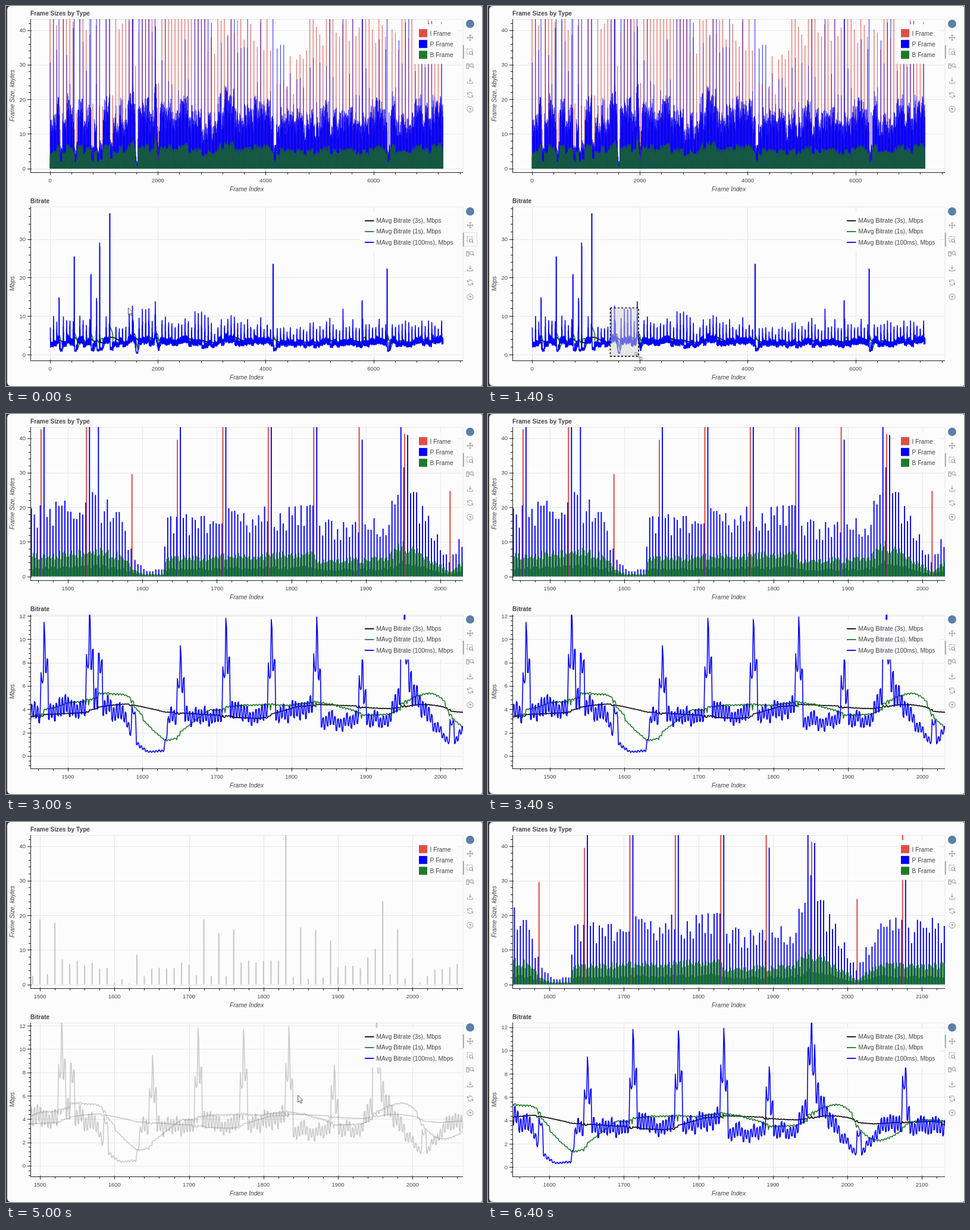
These frames come from a looping animation (800 px wide and 640 px high, 6500 ms). An HTML page with a canvas:

```html
<!DOCTYPE html>
<html lang="en">
<head>
<meta charset="utf-8">
<title>Frame sizes and bitrate</title>
<style>
  html, body { margin: 0; width: 100%; height: 100%; overflow: hidden; background: #fdfcfd; }
  canvas { display: block; }
</style>
</head>
<body>
<canvas id="stage" width="800" height="640"></canvas>
<script>
const g = document.getElementById('stage').getContext('2d');
const LOOP = 6500, STEP = 100;
const FONT = '"Liberation Sans", Arial, sans-serif';
const RED = '#de4f45', BLUE = '#0000ff', GREEN = '#1f7a28', INK = '#444';
const LEFT = 41, RIGHT = 768;

// ---------- data: one group = I frame, then P on every 4th frame, B between ----------
const COUNT = 7290, GROUP = 61;

function rand(n) {
  let h = Math.imul(n + 977, 2654435761);
  h = Math.imul(h ^ h >>> 15, 2246822519);
  h = Math.imul(h ^ h >>> 13, 3266489917);
  return ((h ^ h >>> 16) >>> 0) / 4294967296;
}

// linear interpolation through [key, value...] rows
function along(points, key, col = 1) {
  if (key <= points[0][0]) return points[0][col];
  for (let i = 1; i < points.length; i++) {
    const a = points[i - 1], b = points[i];
    if (key <= b[0]) return a[col] + (b[col] - a[col]) * (key - a[0]) / (b[0] - a[0]);
  }
  return points[points.length - 1][col];
}

// scene activity = typical P size in kbytes
const activity = [[0, 17], [1460, 17], [1545, 21], [1572, 17], [1586, 7], [1602, 1.8], [1627, 1.8],
  [1632, 15], [1829, 19], [1836, 13.5], [1930, 15], [1948, 28], [1975, 19], [2013, 4], [2040, 16],
  [2600, 18], [2700, 14], [3050, 14.5], [3200, 20], [4050, 19], [4200, 15], [7290, 17.5]];
const iLevel = [[0, 47], [2700, 46], [2900, 40], [4050, 40], [4150, 28], [4700, 28], [4800, 42], [7290, 40]];
// [frame, peak Mbps]
const bursts = [[166, 14.8], [447, 25.4], [756, 20.4], [861, 14.5], [916, 29], [1104, 36.6],
  [1541, 8.8], [1947, 10.2], [4134, 23.5], [5430, 11.8], [5783, 13.8], [6247, 22.2]];
// first and last group of the runs with a heavy first P frame
const heavyRuns = [[24, 25], [28, 30], [44, 48]];

const typeOf = n => n % GROUP === 0 ? 'I' : n % GROUP % 4 === 0 ? 'P' : 'B';

function frameSize(n) {
  const group = Math.floor(n / GROUP), pos = n % GROUP, r = rand(n);
  const level = along(activity, n);
  const swing = n > 1440 && n < 2140 ? 1 : .68 + .4 * rand(group + 50000);
  const type = typeOf(n);
  if (type === 'I') return (along(iLevel, n) + 14 * (r - .5)) * (.35 + .65 * Math.min(1, level / 13));
  if (type === 'B') return .35 * level * swing * (pos % 4 === 2 ? .42 : 1) * (.75 + .4 * r);
  if (pos === 4 && heavyRuns.some(([a, b]) => group >= a && group <= b)) return 60 + 8 * r;
  if (pos === 4 && level > 10) return 16 + 34 * r * r;
  return level * swing * (.72 + .48 * r);
}

const sizes = Array.from({ length: COUNT }, (_, n) => frameSize(n));
for (const [at, peak] of bursts) {
  let n = at;
  while (typeOf(n) !== 'P') n++;
  const near = sizes.slice(n - 5, n).reduce((a, b) => a + b, 0);
  sizes[n] = Math.max(20, peak * 12.5 - near);
  if (peak > 14) for (let i = n + 6; i < n + 62; i++) sizes[i] *= .4;
}

// trailing mean over w frames at 60 fps, in Mbps
function movingRate(w) {
  let sum = 0;
  return sizes.map((s, n) => {
    sum += s - (n >= w ? sizes[n - w] : 0);
    return n >= w - 1 ? sum / w * .48 : null;
  });
}
const rates = [
  { label: 'MAvg Bitrate (3s), Mbps', color: '#000', data: movingRate(180) },
  { label: 'MAvg Bitrate (1s), Mbps', color: GREEN, data: movingRate(60) },
  { label: 'MAvg Bitrate (100ms), Mbps', color: BLUE, data: movingRate(6) }
];
const types = [['I', RED], ['P', BLUE], ['B', GREEN]];

// ---------- timeline ----------
const drag = [[300, 206, 508.5], [700, 236, 570], [1300, 252, 589], [1900, 258, 594]];
const pointer = [[3600, 420, 470], [3900, 780, 369], [4100, 780, 369], [4400, 567.5, 456],
  [4600, 537.5, 457], [5500, 432, 464], [5900, 411.5, 462.5]];
const ZOOM_AT = 2900, PAN_PICK = 4000, PAN_FROM = 4600, PAN_TO = 5900, SHARP_AT = 6100;

function viewAt(t) {
  if (t < ZOOM_AT) return { ox: 74, sx: .09062, oy: 587, sy: 6.48, xStep: 2000, yStep: 10 };
  const p = Math.max(PAN_FROM, Math.min(PAN_TO, t));
  return {
    ox: -1774.3 + along(pointer, p) - 537.5, sx: 1.2522,
    oy: 575.8 + along(pointer, p, 2) - 457, sy: 19.65, xStep: 100, yStep: 2
  };
}

// ---------- drawing ----------
function line(color, width, ...pts) {
  g.strokeStyle = color;
  g.lineWidth = width;
  g.beginPath();
  for (let i = 0; i < pts.length; i += 2) g.lineTo(pts[i], pts[i + 1]);
  g.stroke();
}

function text(s, x, y, size, align = 'left', style = '') {
  g.font = `${style} ${size}px ${FONT}`;
  g.textAlign = align;
  g.fillStyle = INK;
  g.fillText(s, x, y);
}

// calls fn(value, pixel, isMajor) for every tick inside lo..hi
function ticks(o, s, step, lo, hi, fn) {
  const a = (lo - o) / s, b = (hi - o) / s, minor = step / 5;
  const first = Math.ceil(Math.min(a, b) / minor), last = Math.floor(Math.max(a, b) / minor);
  for (let i = first; i <= last; i++) fn(Math.round(i * minor), o + i * minor * s, i % 5 === 0);
}

function grid(p) {
  const put = (px, major, vertical) => {
    if (!major) return;
    const q = Math.round(px) + .5;
    if (vertical) line('#e6e5e8', 1, q, p.top, q, p.bottom);
    else line('#e6e5e8', 1, LEFT, q, RIGHT, q);
  };
  ticks(p.ox, p.sx, p.xStep, LEFT, RIGHT, (v, px, major) => put(px, major, true));
  ticks(p.oy, -p.sy, p.yStep, p.bottom, p.top, (v, py, major) => put(py, major, false));
  g.strokeStyle = '#e6e5e8';
  g.strokeRect(LEFT + .5, p.top + .5, RIGHT - LEFT - .5, p.bottom - p.top);
}

function axes(p) {
  const { top, bottom } = p;
  line('#222', 1, LEFT + .5, top, LEFT + .5, bottom + .5);
  line('#222', 1, LEFT, bottom + .5, RIGHT, bottom + .5);
  ticks(p.ox, p.sx, p.xStep, LEFT, RIGHT, (v, px, major) => {
    const x = Math.round(px) + .5;
    line('#222', 1, x, bottom - (major ? 1.5 : 0), x, bottom + (major ? 5 : 3.5));
    if (major) text(v, px, bottom + 16.5, 9.4, 'center');
  });
  ticks(p.oy, -p.sy, p.yStep, bottom, top, (v, py, major) => {
    const y = Math.round(py) + .5;
    line('#222', 1, LEFT - (major ? 5 : 3), y, LEFT + (major ? 2 : 0), y);
    if (major) text(v, 33, py + 3.5, 9.4, 'right');
  });
  text(p.title, LEFT, top - 6.5, 10.2, 'left', 'bold');
  text('Frame Index', (LEFT + RIGHT) / 2, bottom + 32, 10.2, 'center', 'italic');
  g.save();
  g.translate(14, (top + bottom) / 2);
  g.rotate(-Math.PI / 2);
  text(p.yLabel, 0, 0, 10.2, 'center', 'italic');
  g.restore();
}

function clipTo(p, fn) {
  g.save();
  g.beginPath();
  g.rect(LEFT, p.top, RIGHT - LEFT, p.bottom - p.top);
  g.clip();
  fn();
  g.restore();
}

function bars(p, grey) {
  const w = p.sx * .9 + .78;
  const bar = n => {
    const h = sizes[n] * p.sy;
    g.fillRect(p.ox + n * p.sx - w / 2, p.oy - h, w, h);
  };
  const layer = (type, color, alpha = 1) => {
    g.fillStyle = color;
    g.globalAlpha = alpha;
    for (let n = 0; n < COUNT; n++) if (typeOf(n) === type) bar(n);
  };
  if (grey) {
    g.fillStyle = '#c2c1c3';
    for (let n = 0; n < COUNT; n += 10) bar(n);
    return;
  }
  layer('I', RED);
  layer('P', BLUE);
  layer('I', RED, .35);   // I frames shimmer through the blue
  layer('B', p.sx < 1 ? '#185a45' : GREEN);
}

function curves(p, grey) {
  g.lineJoin = 'round';
  g.lineWidth = 1.6;
  for (const { color, data } of rates) {
    g.strokeStyle = grey ? 'rgba(128,128,128,.4)' : color;
    g.beginPath();
    data.forEach((v, n) => { if (v !== null) g.lineTo(p.ox + n * p.sx, p.oy - v * p.sy); });
    g.stroke();
  }
}

function legendBox(x, y) {
  g.fillStyle = 'rgba(253,252,253,.96)';
  g.fillRect(x, y, 760 - x, 67);
}

function legends() {
  legendBox(686, 30.5);
  types.forEach(([type, color], i) => {
    g.fillStyle = color;
    g.fillRect(694, 39 + i * 18.2, 14, 13.5);
    text(type + ' Frame', 712.5, 49.5 + i * 18.2, 10.2);
  });
  legendBox(595, 346.5);
  rates.forEach(({ label, color }, i) => {
    line(color, 1.8, 603, 361.7 + i * 18.2, 618.5, 361.7 + i * 18.2);
    text(label, 622.5, 365.2 + i * 18.2, 10.2);
  });
}

const icons = {
  pan() {
    line(g.strokeStyle, 1, -4.5, 0, 4.5, 0);
    line(g.strokeStyle, 1, 0, -4.5, 0, 4.5);
    for (let i = 0; i < 4; i++) {
      line(g.strokeStyle, 1, -1.8, -3.3, 0, -5.2, 1.8, -3.3);
      g.rotate(Math.PI / 2);
    }
  },
  box() {
    g.setLineDash([2, 1.5]);
    g.strokeRect(-5, -5, 9, 9);
    g.setLineDash([]);
    lens(1.5, 1.5, 2.6);
  },
  wheel() {
    g.strokeRect(-6, -4, 4, 7.5);
    line(g.strokeStyle, 1, -4, -3, -4, -1);
    lens(2.5, -1.5, 2.8);
  },
  save() {
    line(g.strokeStyle, 1, -4.5, 2, -4.5, 4.5, 4.5, 4.5, 4.5, 2);
    line(g.strokeStyle, 1, 0, -5, 0, 1.5);
    line(g.strokeStyle, 1, -2.5, -1, 0, 1.5, 2.5, -1);
  },
  reset() {
    for (let i = 0; i < 2; i++) {
      g.beginPath();
      g.arc(0, 0, 4.3, Math.PI * 1.05, Math.PI * 1.9);
      g.stroke();
      line(g.strokeStyle, 1, -4.5, -4.5, -4.3, -1.2, -1.5, -1.2);
      g.rotate(Math.PI);
    }
  },
  help() {
    g.beginPath();
    g.arc(0, 0, 5, 0, 7);
    g.stroke();
    text('?', 0, 2.8, 8, 'center');
  }
};

function lens(x, y, r) {
  g.beginPath();
  g.arc(x, y, r, 0, 7);
  g.stroke();
  line(g.strokeStyle, 1.2, x + r * .7, y + r * .7, x + r * .7 + 2, y + r * .7 + 2);
}

function toolbar(top, active, hover) {
  g.fillStyle = '#5b7fa8';
  g.beginPath();
  g.arc(780, top + 30, 7, 0, 7);
  g.fill();
  Object.keys(icons).forEach((name, i) => {
    const y = top + 53.3 + i * 24.1;
    if (name === hover) {
      g.strokeStyle = '#dcdbde';
      g.lineWidth = 1;
      g.strokeRect(768.5, Math.round(y) - 11.5, 23, 23);
    }
    if (name === active) line('#62b5c4', 1.8, 768.8, y - 11.5, 768.8, y + 11.5);
    g.save();
    g.translate(780, y);
    g.strokeStyle = '#8f9396';
    g.lineWidth = 1;
    icons[name]();
    g.restore();
  });
}

function selection(x, y) {
  g.fillStyle = 'rgba(211,211,211,.5)';
  g.fillRect(205.5, 508.5, x - 205.5, y - 508.5);
  g.setLineDash([3.1, 3.1]);
  g.strokeStyle = '#000';
  g.lineWidth = 1.6;
  g.strokeRect(205.5, 508.5, x - 205.5, y - 508.5);
  g.setLineDash([]);
}

function resizeCursor(x, y) {
  for (const [color, w] of [['#555', 2.6], ['#fff', 1.2]]) {
    line(color, w, x - 5, y - 5, x + 5, y + 5);
    line(color, w, x - 5, y - 1.5, x - 5, y - 5, x - 1.5, y - 5);
    line(color, w, x + 5, y + 1.5, x + 5, y + 5, x + 1.5, y + 5);
  }
}

function arrow(x, y) {
  g.save();
  g.translate(x, y);
  g.beginPath();
  for (const [px, py] of [[0, 0], [0, 12], [2.7, 9.6], [4.6, 13.6], [6.4, 12.8], [4.6, 8.9], [8.3, 8.6]])
    g.lineTo(px, py);
  g.closePath();
  g.fillStyle = '#fff';
  g.fill();
  g.strokeStyle = '#555';
  g.lineWidth = 1;
  g.stroke();
  g.restore();
}

function draw(t) {
  const v = viewAt(t), grey = t >= PAN_FROM && t < SHARP_AT;
  const sizePlot = { ...v, oy: 273.5, sy: 5.825, yStep: 10, top: 22, bottom: 280,
    title: 'Frame Sizes by Type', yLabel: 'Frame Size, kbytes' };
  const ratePlot = { ...v, top: 338, bottom: 597, title: 'Bitrate', yLabel: 'Mbps' };

  g.fillStyle = '#39383b';
  g.fillRect(0, 0, 800, 640);
  g.fillStyle = '#fdfcfd';
  g.beginPath();
  g.roundRect(2, 0, 798, 640, [6, 3, 3, 6]);
  g.fill();

  grid(sizePlot);
  clipTo(sizePlot, () => bars(sizePlot, grey));
  axes(sizePlot);
  grid(ratePlot);
  clipTo(ratePlot, () => curves(ratePlot, grey));
  axes(ratePlot);
  legends();

  toolbar(0, 'box', '');
  const hover = t < 200 ? 'box' : t >= PAN_PICK - 100 && t < 4500 ? 'pan' : '';
  toolbar(316, t < 200 || t >= PAN_PICK ? (t < 200 ? 'box' : 'pan') : 'box', hover);

  if (t < 400) arrow(205.5, 508);
  else if (t < ZOOM_AT) {
    const x = along(drag, t), y = along(drag, t, 2);
    selection(x, y);
    resizeCursor(x, y);
  } else if (t >= 3600 && t <= PAN_TO) arrow(along(pointer, t), along(pointer, t, 2));
}

let shown = -1;
function tick() {
  const t = Math.floor(performance.now() % LOOP / STEP) * STEP;
  if (t !== shown) draw(shown = t);
  requestAnimationFrame(tick);
}
tick();
</script>
</body>
</html>
```
